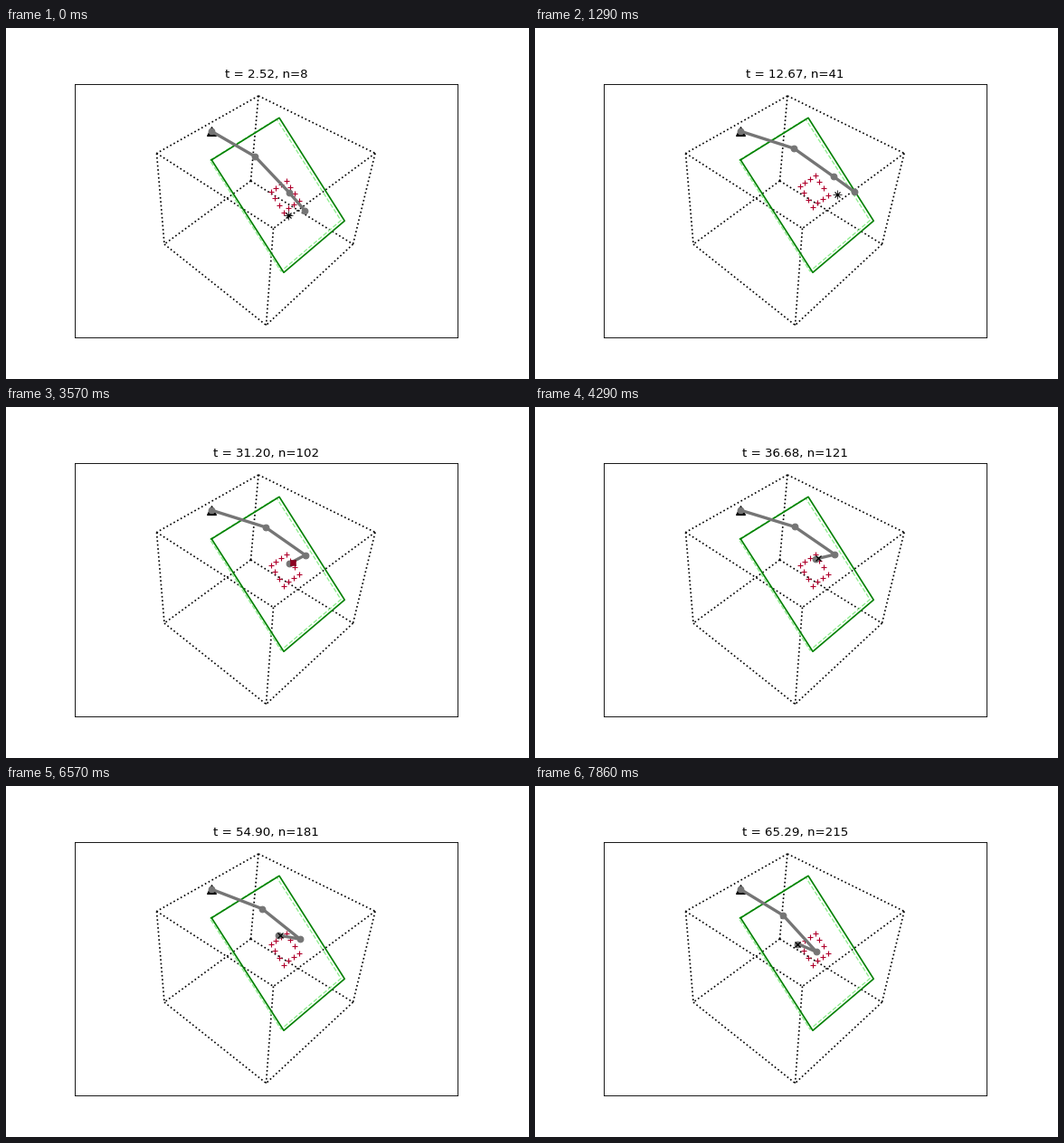
A matplotlib script for the animation above (8000 ms loop, 578 by 388 pixels).

```python
import matplotlib.pyplot as plt
import numpy as np
from matplotlib.animation import FuncAnimation

W, H, DPI = 578, 388, 80
LEFT, RIGHT, TOP, BOTTOM = 76, 499, 62, 342
LOOP, TICK, STEPS = 8000, 40, 56
TICKS = LOOP // TICK

# Cube corners in binary order: neighbours differ in one bit.
CUBE = [(279, 75), (166.5, 138.5), (408, 138.5), (295.5, 221.5),
        (270.5, 169), (175, 239), (383.5, 239), (287.5, 328.5)]
PLANE = np.array([(227.2, 145.8), (302, 99.3), (374.2, 213.2), (307, 270.3)])
SQUARE = np.array([(309.8, 162.8), (292.8, 174.8), (306.8, 197.8), (323.8, 184.8)])

# Base and both elbows with the arm fully lowered and fully raised.
LOW = np.array([(226.8, 114), (274.3, 143), (311, 183.3)])
HIGH = np.array([(226.8, 114), (287.5, 132), (332.2, 162.2)])

# Step: lift, hand angle in degrees, hand length, tracked point x and y.
POSES = {
    0: (0.08, 49, 26.6, 312, 207),
    9: (0.90, 36, 28.2, 334, 184),
    17: (0.93, 152, 19.5, 317.2, 172.2),
    25: (0.93, 152, 19.5, 317.2, 172.2),
    36: (1.00, 184, 25, 309, 160.3),
    55: (0.00, 203, 22.4, 290.4, 174.6),
}
TURN, LAST = 36, 55


def pose(step):
    """Linear between poses, with an ease-in on the final leg."""
    if step > TURN:
        span = LAST - TURN
        step = TURN + span * ((step - TURN) / span) ** 1.7
    return [np.interp(step, list(POSES), column) for column in zip(*POSES.values())]


def clock(step):
    return np.interp(step, [0, 9, 17, 25, 36, 46, 55],
                     [2.52, 12.67, 22.02, 31.20, 43.26, 54.90, 65.29])


def closed(points):
    return np.vstack([points, points[:1]]).T


def along(corners, count):
    """Evenly spaced points on a closed path."""
    ends = np.roll(corners, -1, axis=0)
    return np.vstack([corners + (ends - corners) * k / count for k in range(count)])


fig = plt.figure(figsize=(W / DPI, H / DPI), dpi=DPI, facecolor="white")
ax = fig.add_axes([LEFT / W, 1 - BOTTOM / H, (RIGHT - LEFT) / W, (BOTTOM - TOP) / H])
ax.set(xlim=(LEFT, RIGHT), ylim=(BOTTOM, TOP), xticks=[], yticks=[])
title = ax.set_title("", fontsize=12, fontfamily="DejaVu Sans")

for a in range(8):
    for bit in (1, 2, 4):
        if not a & bit:
            ax.plot(*zip(CUBE[a], CUBE[a | bit]), "k:", lw=1.5, zorder=1)

center = PLANE.mean(axis=0)
estimate = center + 0.985 * (PLANE - center) + (-3, 0)
ax.plot(*closed(estimate), "--", color="lightgreen", lw=1.2, zorder=2)
ax.plot(*closed(PLANE), color="green", lw=1.5, zorder=3)
ax.plot(*LOW[0], "k^", ms=9.5, zorder=4)

GRID = along(SQUARE, 3)
crosses, = ax.plot([], [], "+", color="#b0002c", ms=5.5, mew=1, zorder=5)
arm, = ax.plot([], [], "o-", color="0.46", lw=3, ms=6, zorder=6)
star, = ax.plot([], [], "kx", ms=6, mew=1.1, zorder=7)
whisker, = ax.plot([], [], "k+", ms=9, mew=0.7, zorder=7)
contact, = ax.plot([], [], "s", color="#8b0020", ms=5, mew=0.5, zorder=8)


def draw(tick):
    step = int((tick + 0.95) * STEPS / TICKS)
    lift, angle, length, x, y = pose(step)
    t = clock(step)
    title.set_text(f"t = {t:.2f}, n={int(3.3 * t)}")

    joints = LOW + lift * (HIGH - LOW)
    angle = np.radians(angle)
    tip = joints[-1] + length * np.array([np.cos(angle), np.sin(angle)])
    arm.set_data(*np.vstack([joints, tip]).T)

    drop = 6 if step < 9 else 0
    crosses.set_data(*(GRID + (0, drop)).T)

    for mark, shown in ((star, True), (whisker, step < 14), (contact, 14 <= step < 30)):
        mark.set_data([x], [y])
        mark.set_visible(shown)
    return title, arm, crosses, star, whisker, contact


anim = FuncAnimation(fig, draw, frames=TICKS, interval=TICK,
                     init_func=lambda: draw(0), repeat=True, repeat_delay=0)
plt.show()
```
